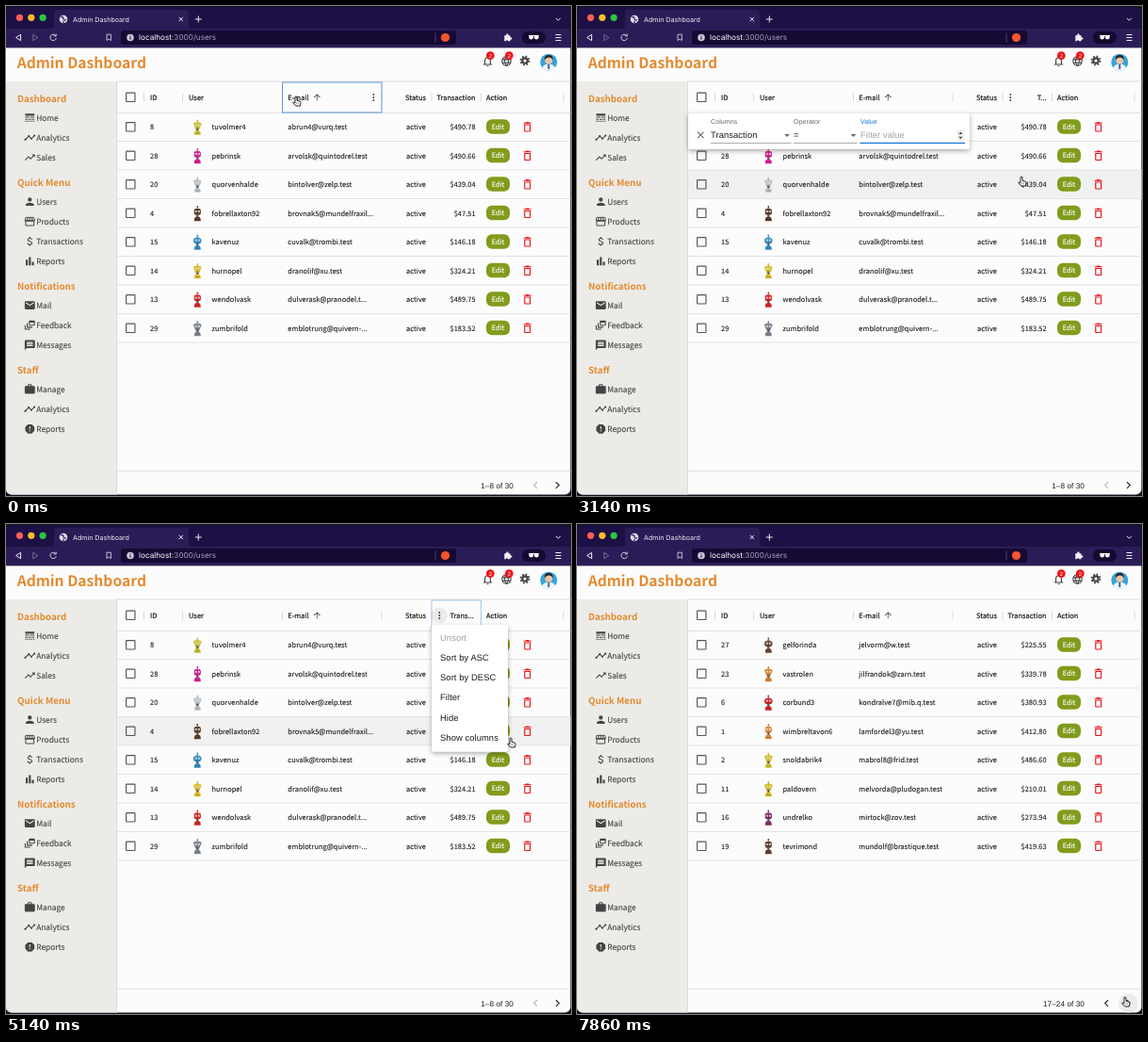
Animation, 600 px wide and 520 px high, one loop 8000 ms. Source, as an HTML page:

```html
<!DOCTYPE html>
<html lang="en">
<head>
<meta charset="utf-8">
<title>Admin Dashboard</title>
<style>
html, body { margin: 0; width: 100%; height: 100%; overflow: hidden; background: #17131f; }
svg { display: block; width: 600px; height: 520px; }
text { font: 7.4px "Noto Sans CJK JP", "Noto Sans CJK SC", "Noto Sans CJK", "Noto Sans", sans-serif; fill: #1c1c1c; text-rendering: geometricPrecision; white-space: pre; }
.title { font-size: 15.65px; font-weight: 700; fill: #e38b30; }
.group { font-size: 9.75px; font-weight: 700; fill: #e38b30; }
.item { font-size: 8.35px; fill: #444; stroke: #444; stroke-width: .12px; }
.cell { letter-spacing: .07px; stroke: #1c1c1c; stroke-width: .12px; }
.head { stroke-width: .22px; }
.edit { font-size: 7.3px; fill: #fff; stroke: #fff; stroke-width: .15px; }
.ui { font-family: Inter, Roboto, sans-serif; font-size: 7.1px; fill: #f0eef6; }
.url { font-family: Inter, Roboto, sans-serif; font-size: 8.2px; fill: #fff; }
.menu { font-family: "Liberation Sans", Arial, sans-serif; font-size: 9.38px; letter-spacing: .08px; }
.label { font-family: "Liberation Sans", Arial, sans-serif; font-size: 7.04px; letter-spacing: .07px; fill: #666; }
.pager { font-family: "Liberation Sans", Arial, sans-serif; font-size: 8.2px; letter-spacing: .07px; }
.badge { font-family: "Liberation Sans", Arial, sans-serif; font-size: 6px; fill: #fff; }
</style>
</head>
<body>
<svg viewBox="0 0 600 520">
  <defs>
    <clipPath id="window"><rect x="0" y="1" width="599.4" height="517.4" rx="6"/></clipPath>
    <filter id="shadow" x="-20%" y="-20%" width="140%" height="150%">
      <feDropShadow dx="0" dy="2" stdDeviation="2.6" flood-opacity=".32"/>
    </filter>
  </defs>
  <g clip-path="url(#window)"><g id="frame"></g><g id="live"></g></g>
  <g id="pointer"></g>
</svg>
<script>
const LOOP = 8000, STEP = 1000 / 7, ROW = 30.5, TOP = 113;

const rect = (x, y, w, h, fill, more = '') => `<rect x="${x}" y="${y}" width="${w}" height="${h}" fill="${fill}" ${more}/>`;
const circle = (x, y, r, fill, more = '') => `<circle cx="${x}" cy="${y}" r="${r}" fill="${fill}" ${more}/>`;
const stroke = (d, color, w = 1, more = '') => `<path d="${d}" fill="none" stroke="${color}" stroke-width="${w}" ${more}/>`;
const text = (s, x, y, cls, more = '') => `<text x="${x}" y="${y}" class="${cls}" ${more}>${s}</text>`;
const END = 'text-anchor="end"', MID = 'text-anchor="middle"';

// Icons live on a 24 unit grid, centred at x, y.
const icon = (name, x, y, size, color = '#444') =>
  `<g transform="translate(${x - size / 2} ${y - size / 2}) scale(${size / 24})" fill="${color}" color="${color}" fill-rule="evenodd">${icons[name]}</g>`;
const path = d => `<path d="${d}"/>`;
const line = (d, w = 2) => stroke(d, 'currentColor', w);
const icons = {
  home: path('M3 4h18v4H3zM3 10h8v2H3zM13 10h8v2h-8zM3 14h5v2H3zM9.5 14h5v2h-5zM16 14h5v2h-5zM3 18h2v2H3zM7 18h2v2H7zM11 18h2v2h-2zM15 18h2v2h-2zM19 18h2v2h-2z'),
  chart: line('M3 16l7-7 5 5 6-6') + [[3, 16], [10, 9], [15, 14], [21, 8]].map(p => circle(...p, 2, 'currentColor')).join(''),
  trend: path('M16 6l2.29 2.29-4.88 4.88-4-4L2 16.59 3.41 18l6-6 4 4 6.3-6.29L22 12V6z'),
  person: path('M12 12a4 4 0 1 0 0-8 4 4 0 0 0 0 8zm0 2c-2.67 0-8 1.34-8 4v2h16v-2c0-2.66-5.33-4-8-4z'),
  store: line('M4 11v9h16v-9M4 4h16l1.5 6H2.5zM8 4l-1 6v2M16 4l1 6v2M12 4v8M2.5 10q2 4 4.5 0 2.5 4 5 0 2.5 4 5 0 2.5 4 4.5 0', 1.8),
  dollar: line('M16 8.5q-.5-2.5-4-2.5t-3.7 2.8q0 2.2 3.7 3.2 4.2 1 4.2 3.5T12 18.2t-4.5-2.9M12 3v3M12 18v3', 2.1),
  bars: path('M4 9h4v11H4zM16 13h4v7h-4zM10 4h4v16h-4z'),
  mail: path('M20 4H4c-1.1 0-2 .9-2 2v12c0 1.1.9 2 2 2h16c1.1 0 2-.9 2-2V6c0-1.1-.9-2-2-2zm0 4l-8 5-8-5V6l8 5 8-5v2z'),
  feed: path('M12 3h8q2 0 2 2v6q0 2-2 2h-8q-2 0-2-2V5q0-2 2-2zM12 7v4h8V7z') + line('M7 8v8h10M3 12v8h10'),
  message: path('M20 2H4c-1.1 0-2 .9-2 2v18l4-4h14c1.1 0 2-.9 2-2V4c0-1.1-.9-2-2-2zM6 12h12v2H6zM6 9h12v2H6zM6 6h12v2H6z'),
  work: path('M20 6h-4V4q0-2-2-2h-4Q8 2 8 4v2H4Q2 6 2 8v11q0 2 2 2h16q2 0 2-2V8q0-2-2-2zm-6 0h-4V4h4z'),
  report: path('M15.73 3H8.27L3 8.27v7.46L8.27 21h7.46L21 15.73V8.27zM11 7h2v6h-2zM11 14.7h2v2.5h-2z'),
  bell: line('M7 17v-6q0-5.5 5-5.5t5 5.5v6M4 18h16M12 3v2') + path('M10 20h4q-.3 2-2 2t-2-2z'),
  globe: line('M12 3a9 9 0 1 0 .01 0zM12 3q-8 9 0 18 8-9 0-18zM4 9h16M4 15h16', 1.9),
  gear: circle(12, 12, 5, 'none', 'stroke="currentColor" stroke-width="4"') + circle(12, 12, 8.2, 'none', 'stroke="currentColor" stroke-width="3.6" stroke-dasharray="3.3 3.14"'),
  box: line('M5 4h14q1 0 1 1v14q0 1-1 1H5q-1 0-1-1V5q0-1 1-1z'),
  trash: path('M6 19c0 1.1.9 2 2 2h8c1.1 0 2-.9 2-2V7H6zM8 9h8v10H8zM15.5 4l-1-1h-5l-1 1H5v2h14V4z'),
  up: path('M4 12l1.41 1.41L11 7.83V20h2V7.83l5.58 5.59L20 12l-8-8z'),
  dots: [6, 12, 18].map(y => circle(12, y, 2, 'currentColor')).join(''),
  puzzle: path('M3 8h5a3 3 0 1 1 5 0h5v5a3 3 0 1 1 0 5v4h-6a2.5 2.5 0 0 0-5 0H3z'),
};

const sidebar = [
  ['Dashboard', 98, ['Home', 'home'], ['Analytics', 'chart'], ['Sales', 'trend']],
  ['Quick Menu', 187, ['Users', 'person'], ['Products', 'store'], ['Transactions', 'dollar'], ['Reports', 'bars']],
  ['Notifications', 297, ['Mail', 'mail'], ['Feedback', 'feed'], ['Messages', 'message']],
  ['Staff', 386, ['Manage', 'work'], ['Analytics', 'chart'], ['Reports', 'report']],
];

// id, user, e-mail, amount, avatar colour
const pages = [`8 tuvolmer4 abrun4@vurq.test 490.78 #cbc32d
28 pebrinsk arvolsk@quintodrel.test 490.66 #dd1f93
20 quorvenhalde bintolver@zelp.test 439.04 #bcc6cb
4 fobrellaxton92 brovnak5@mundelfraxil... 47.51 #5d3b29
15 kavenuz cuvalk@trombi.test 146.18 #2f91c4
14 hurnopel dranolif@xu.test 324.21 #e0bf2c
13 wendolvask dulverask@pranodel.t... 489.75 #d92522
29 zumbrifold emblotrung@quivern-... 183.52 #7d8792`,
`22 vulmarp glonvar@pimlo.test 201.77 #b8b0a2
30 trondavelisk gurmelt@q.test 192.03 #c32024
24 pelbrox gwendrok@vostel.test 392.16 #b9772e
25 yundervalkip hedrulk@narb.test 442.78 #5b2b80
7 domfrenkal8 hilvon2@brandoque.test 54.11 #7b3a9c
17 jastrov hostrelvand@mul.test 443.28 #3b9edb
26 blumendorvask ilvartu@kedo.test 196.96 #e6872c
12 fontrivel jandrovelku@plenvort.t... 300.82 #2b86b8`,
`27 gelforinda jelvorm@w.test 225.55 #6b4732
23 vastrolen jilfrandok@zarn.test 339.78 #d88b2e
6 corbund3 kondralve7@mib.q.test 380.93 #d02227
1 wimbreltavon6 lamfordel3@yu.test 412.80 #df8b38
2 snoldabrik4 mabrol8@frid.test 486.60 #d8c230
11 paldovern melvorda@pludogan.test 210.01 #d5c024
16 undrelko mirtock@zov.test 273.94 #7f2b6b
19 tevrimond mundolf@brastique.test 419.63 #603e2c`].map(p => p.split('\n').map(r => r.split(' ')));

// time, hovered column, focused column, popup, page
const states = [
  [0, 'mail', 'mail', '', 0],
  [1140, 'status', 'mail', '', 0],
  [1430, 'sum', 'mail', '', 0],
  [1860, 'sum', '', 'menu', 0],
  [3000, 'open', '', 'filter', 0],
  [4290, 'sum', '', '', 0],
  [4570, 'focus', 'sum', 'menu', 0],
  [5430, '', 'sum', '', 0],
  [6430, '', '', '', 1],
  [7290, '', '', '', 2],
];

// time, x, y of the fingertip
const track = [
  [0, 308, 96], [570, 308, 96], [1290, 458.5, 96], [1570, 465, 96.5], [2430, 465, 96.5],
  [2860, 472, 181], [3430, 472, 181], [3860, 479, 112], [4140, 479, 112], [4430, 461, 97],
  [4710, 461, 97], [5140, 536, 227], [5570, 536, 227], [6290, 586.5, 506.7], [7290, 586.5, 506.7], [7570, 582, 502],
];

const lastBefore = (table, t) => table.filter(row => row[0] <= t + 5).pop();

function pointerAt(t) {
  const a = lastBefore(track, t), b = track[track.indexOf(a) + 1] || a;
  const k = a === b ? 0 : Math.min(1, Math.max(0, (t - a[0]) / (b[0] - a[0])));
  const e = k * k * (3 - 2 * k);
  return [a[1] + (b[1] - a[1]) * e, a[2] + (b[2] - a[2]) * e];
}

function browser() {
  const lights = ['#ff5f57', '#febc2e', '#28c840'].map((c, i) => circle(14.5 + 12.3 * i, 12.3, 3.6, c)).join('');
  return rect(0, 0, 600, 44, '#1d1044') + rect(0, 24, 600, 20.4, '#2b1c57') + lights
    + `<path d="M47 24q4 0 4-4V8q0-4 4-4h135q4 0 4 4v12q0 4 4 4z" fill="#2b1c57"/>`
    + circle(61, 14, 4.3, '#dedbe8') + stroke('M58 12q3-1 3 1.5t3 1M61 18v-2', '#2b1c57', 1.2)
    + text('Admin Dashboard', 71, 16.7, 'ui')
    + stroke('M183.7 11.9l4.2 4.2m0-4.2l-4.2 4.2M204.3 10.5v7m-3.5-3.5h7M584 12.9l2.4 2.4 2.4-2.4', '#e9e6f2', 1)
    + stroke('M15.6 30.3v6.4l-5-3.2z', '#efedf6', 1) + stroke('M28.800 30.3v6.4l5-3.2z', '#7f7599', .9)
    + stroke('M52.5 31.200a3.200 3.200 0 1 0 .8 3M53.200 29.500v2.400h-2.400', '#d5d1e2', 1)
    + stroke('M107 30.200h4.400v6.400l-2.200-1.700-2.200 1.700z', '#d5d1e2', .9)
    + rect(122, 26, 356, 15, '#160a34', 'rx="3"')
    + circle(132, 33.5, 3.8, '#c9c5d6') + rect(131.5, 33, 1, 2.6, '#160a34') + rect(131.5, 31.2, 1, 1, '#160a34')
    + text('localhost<tspan fill="#a9a3bd">:3000/users</tspan>', 141, 36.4, 'url')
    + rect(455.5, 28.5, 1, 10, '#4b3f70') + circle(466.5, 33.5, 4.6, '#f4552c')
    + icon('puzzle', 533, 33, 10, '#f2f0f7')
    + rect(548, 27, 25, 13, '#140930', 'rx="6"') + rect(555, 31, 11, 1.2, '#fff') + circle(557.7, 33.3, 2.3, '#fff') + circle(563.3, 33.3, 2.3, '#fff')
    + stroke('M583.5 30.5h6m-6 3h6m-6 3h6', '#f2f0f7', 1);
}

function page() {
  const badge = x => circle(x, 52.6, 4.4, '#f01418') + text('2', x, 54.8, 'badge', MID);
  const nav = sidebar.map(([name, y, ...items]) => text(name, 12, y + 3.9, 'group')
    + items.map(([label, glyph], i) => {
      const cy = y + 20.6 + 21.1 * i;
      return icon(glyph, 25.3, cy, 13) + text(label, 32.2, cy + 3.1, 'item');
    }).join('')).join('');
  return rect(0, 44.4, 600, 480, '#fdfcfd') + text('Admin Dashboard', 11.7, 65.6, 'title')
    + icon('bell', 511.5, 58.5, 14) + icon('globe', 531.5, 58.5, 13) + icon('gear', 551, 58, 13) + badge(514.3) + badge(534.3)
    + circle(576.3, 59.7, 9, '#35a3dc') + `<path d="M569.5 66q1-4 5-4.3h3.6q4 .3 5 4.3-6.5 5.5-13.6 0z" fill="#f4f6f8"/>`
    + rect(575.3, 61, 2, 6, '#3568a8') + circle(576.3, 57.8, 3.9, '#f2c49d') + `<path d="M572 57q-.8-5 4.3-5t4.3 5q-2-2.6-4.3-2.4T572 57z" fill="#2c2626"/>`
    + rect(0, 79.8, 117.5, 440, '#ecebe8') + nav
    + stroke('M117.5 520V80H600', '#dcdcdc', 1);
}

function robot(x, y, color, n) {
  const heads = [`<ellipse cx="0" cy="-2" rx="4.3" ry="3.6"/>`, rect(-3.6, -5.5, 7.2, 6.8, color, 'rx="2"'), `<path d="M-4.6-4.5q4.6-3 9.2 0L2 2h-4z"/>`];
  return `<g transform="translate(${x} ${y})" fill="${color}">` + stroke('M0-5v-2.5', '#555', .8) + circle(0, -7.5, .9, color)
    + heads[n % 3] + rect(-1.1, 1, 2.2, 3, '#555') + `<path d="M-3.5 7.7q0-4.5 2-4.5h3q2 0 2 4.5z"/>`
    + circle(-1.5, -2.3, 1.1, '#fff') + circle(1.7, -2.3, 1.1, '#fff') + circle(-1.4, -2.2, .5, '#222') + circle(1.8, -2.2, .5, '#222')
    + stroke('M-1.5.2h3M-2 6h4', '#3338', .7) + '</g>';
}

function header(hover, focus) {
  const sum = { sum: 'T...', open: 'T...', focus: 'Trans...' }[hover];
  const bars = [146.5, 187.5, 293.5, 399, 452, 504.5, 592].map(x => rect(x - .5, 92.5, 1, 9, '#d9d9d9')).join('');
  const labels = [['ID', 153], ['User', 194], ['E-mail', 299.3], ['Action', 510]].map(([s, x]) => text(s, x, 99.8, 'cell head')).join('');
  const box = { mail: [293.5, 105.5, '#5c9ad8'], sum: [452, 52.5, '#a9c5e4'] }[focus];
  const dots = { mail: 390.3, status: 408, sum: 460.3, open: 460.3, focus: 460.3 }[hover];
  const faint = { status: 424.5, sum: 477.5 }[hover];
  return bars + icon('box', 132.3, 96.8, 14, '#555') + labels + icon('up', 330.3, 96.8, 10.6, '#555')
    + text(hover === 'status' ? 'S...' : 'Status', 446, 99.8, 'cell head', END)
    + text(sum || 'Transaction', hover === 'focus' ? 497 : 498.7, 99.8, 'cell head', END)
    + (dots ? icon('dots', dots, 97, 11.7, '#444') : '') + (faint ? icon('up', faint, 96.8, 10.6, '#bbb') : '')
    + (box ? rect(box[0], 81, box[1], 32, 'none', `stroke="${box[2]}"`) : '');
}

const row = ([id, user, mail, sum, color], i) => {
  const y = TOP + 15.3 + ROW * i, base = y + 2.7;
  return rect(118, TOP + ROW * (i + 1) - .5, 482, 1, '#e3e3e3') + icon('box', 132.3, y, 14, '#555')
    + text(id, 153, base, 'cell') + robot(203.3, y + .7, color, +id) + text(user, 218.5, base, 'cell') + text(mail, 299.3, base, 'cell')
    + text('active', 446, base, 'cell', END) + text('$' + sum, 498.7, base, 'cell', END)
    + rect(510, y - 8, 25, 15.5, '#819c1c', 'rx="6"') + text('Edit', 522.5, base - .1, 'edit', MID)
    + icon('trash', 553.7, y, 14, '#e8141c');
};

function footer(n, over) {
  const range = `${n * 8 + 1}–${n * 8 + 8} of 30`;
  return rect(118, 493, 482, 1, '#e0e0e0') + text(range, 539, 511.5, 'pager', END)
    + (over ? circle(585.5, 508.5, 10.5, '#ececec') : '')
    + stroke('M564 505.3l-3.3 3.3 3.3 3.3', n ? '#333' : '#bbb', 1.3) + stroke('M584 505.3l3.3 3.3-3.3 3.3', '#333', 1.3);
}

const popups = {
  '': () => '',
  menu: () => circle(460.3, 97, 8.5, '#0001') + rect(452, 107, 81, 134.5, '#fff', 'rx="2.3" filter="url(#shadow)"')
    + ['Unsort', 'Sort by ASC', 'Sort by DESC', 'Filter', 'Hide', 'Show columns']
      .map((s, i) => text(s, 461, 124.1 + 21.1 * i, 'menu', i ? '' : 'style="fill:#9e9e9e"')).join(''),
  filter: () => {
    const drop = x => `<path d="M${x - 2.8} 136h5.6l-2.8 2.9z" fill="#666"/>`;
    return rect(118, 113.5, 299, 38.5, '#fff', 'rx="2.3" filter="url(#shadow)"')
      + stroke('M128 133.7l6.5 6.5m0-6.5l-6.5 6.5', '#666', 1.1)
      + text('Columns', 142, 125.3, 'label') + text('Operator', 230, 125.3, 'label') + text('Value', 301, 125.3, 'label', 'style="fill:#1976d2"')
      + text('Transaction', 142, 140.4, 'menu') + text('=', 230, 140.4, 'menu') + text('Filter value', 301, 140.4, 'menu', 'style="fill:#a2a2a2"')
      + drop(223) + drop(293.5) + rect(142, 145, 85.5, .7, '#888') + rect(230, 145, 67.5, .7, '#888') + rect(300.5, 144.8, 111.5, 1.3, '#1976d2')
      + rect(403.3, 131.5, 8, 11.5, '#eee', 'rx="2"') + `<path d="M405.3 136l2-2.6 2 2.6zM405.3 138.7l2 2.6 2-2.6z" fill="#444"/>`;
  },
};

const covered = (popup, x, y) => popup === 'menu' ? x > 452 && x < 533 && y < 242 : popup === 'filter' && x < 417 && y < 152;

const hand = (x, y) => `<path transform="translate(${x} ${y})" d="M-1 1a1 1 0 0 1 2 0v3.4l3 .7q1.2.3 1 1.5l-.6 3.4H-.2L-3.4 6.6q.2-1.3 2.4.2z" fill="#fff" stroke="#111" stroke-width=".9" stroke-linejoin="round"/>`
  + stroke(`M${x + .8} ${y + 6.3}v2m1.5-2v2`, '#333', .5);

const $ = id => document.getElementById(id);

function draw(t) {
  const [, hover, focus, popup, n] = lastBefore(states, t);
  const [x, y] = pointerAt(t);
  const index = Math.floor((y - TOP) / ROW);
  const lit = index >= 0 && index < 8 && !covered(popup, x, y);
  $('live').innerHTML = (lit ? rect(118, TOP + ROW * index, 482, ROW, '#f1f1f1') : '')
    + rect(118, TOP, 482, 1, '#e0e0e0') + header(hover, focus) + pages[n].map(row).join('')
    + footer(n, Math.hypot(x - 585.5, y - 508.5) < 11) + popups[popup]();
  $('pointer').innerHTML = hand(x, y);
}

$('frame').innerHTML = browser() + page();
let shown = -1;
const start = performance.now();
function tick(now) {
  const step = Math.floor(((Math.max(0, now - start) % LOOP) + 3) / STEP);
  if (step !== shown) draw((shown = step) * STEP);
  requestAnimationFrame(tick);
}
draw(0);
requestAnimationFrame(tick);
</script>
</body>
</html>
```
